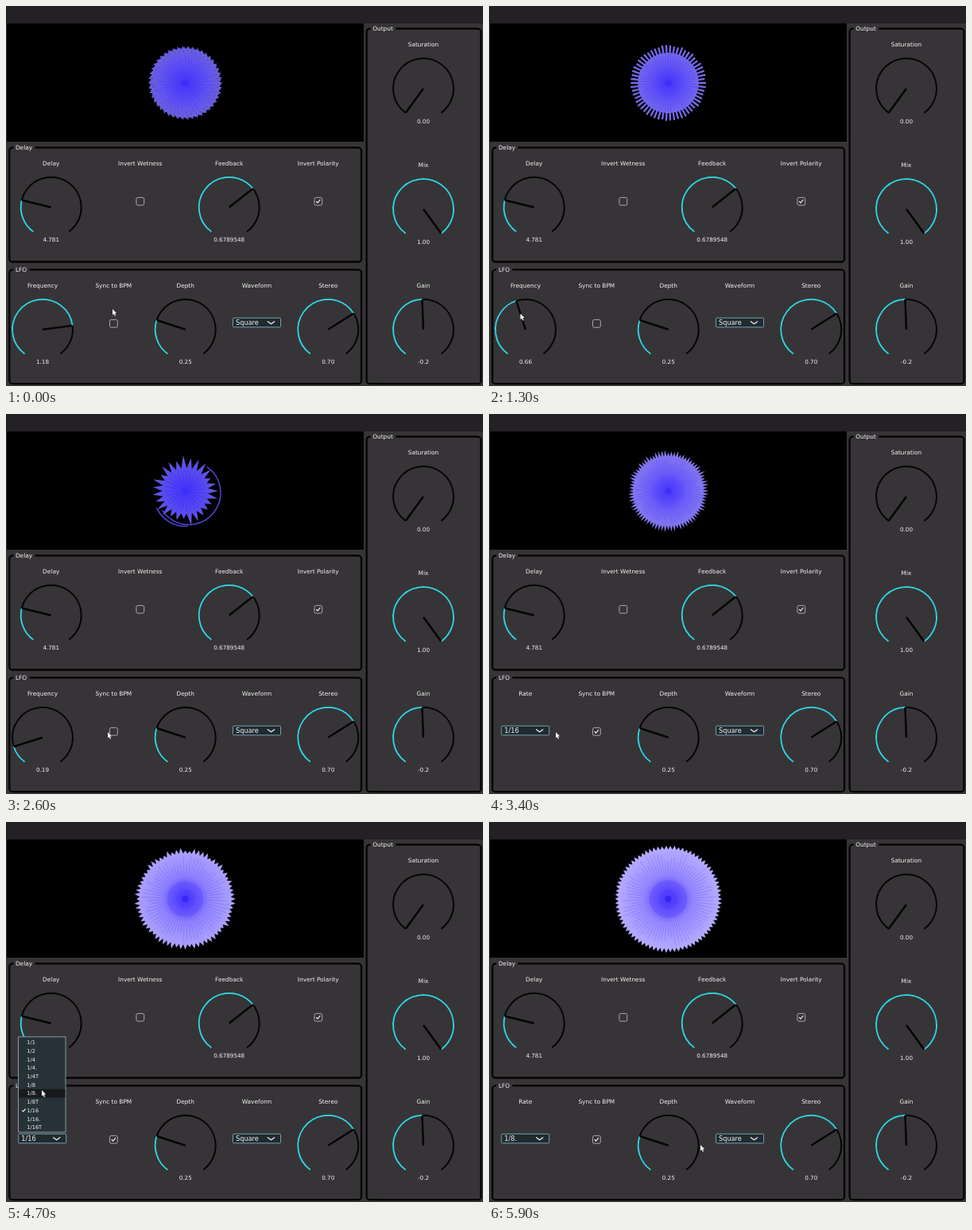
Animation, 600 px wide and 479 px high, one loop 6000 ms. Source, as an HTML page with a canvas:

```html
<!DOCTYPE html>
<html lang="en">
<head>
<meta charset="utf-8">
<title>Delay plugin</title>
<style>
html, body { margin: 0; width: 100%; height: 100%; overflow: hidden; background: #373437; }
canvas { display: block; }
</style>
</head>
<body>
<canvas id="stage" width="600" height="479"></canvas>
<script>
const ctx = document.getElementById('stage').getContext('2d');
const LOOP = 6000, STEP = 100, TAU = Math.PI * 2;
const CYAN = '#35d0df', WHITE = '#f2f2f2', BLACK = '#050505', PANEL = '#373437';
const RATES = ['1/1', '1/2', '1/4', '1/4.', '1/4T', '1/8', '1/8.', '1/8T', '1/16', '1/16.', '1/16T'];

// Each key: time, then the values to interpolate.
const cursorKeys = [
  [0, 134, 382], [500, 70, 402], [800, 59, 390], [1200, 43, 385], [1600, 29, 396],
  [1900, 27, 407], [2100, 28, 411], [2500, 124, 403], [2600, 128, 401], [2800, 134, 399],
  [3000, 133, 399], [3400, 84, 401], [3700, 64, 399], [4000, 63, 398], [4400, 47, 350],
  [4700, 45, 338], [5000, 45, 340], [5500, 200, 395], [5900, 266, 407]
];
const frequencyKeys = [[500, 1.18], [800, 1.02], [1900, 0.22], [2000, 0.19]];
// Radius, tooth depth, raggedness, lightness.
const bloomKeys = [
  [0, 46.5, .22, 0, .08], [800, 50, .2, .09, .35], [1900, 46.5, .22, 0, .08],
  [2600, 45, .36, .22, 0], [3400, 52.5, .17, .08, .4], [4700, 65, .12, .07, .9],
  [5900, 68, .08, .02, 1]
];
const bloomStyles = ['lattice', 'spokes', 'lattice', 'star', 'teeth', 'teeth', 'teeth'];
const bloomCounts = [46, 58, 46, 27, 76, 68, 78];

function track(keys, t) {
  let i = 0;
  while (i < keys.length - 1 && keys[i + 1][0] <= t) i++;
  const a = keys[i], b = keys[Math.min(i + 1, keys.length - 1)];
  const u = b === a ? 0 : Math.max(0, (t - a[0]) / (b[0] - a[0]));
  return a.slice(1).map((v, k) => v + (b[k + 1] - v) * u);
}

function random(i) {
  const x = Math.sin(i * 12.9898 + 4.1) * 43758.5453;
  return x - Math.floor(x);
}

function text(str, x, y, size = 7.4, align = 'center') {
  ctx.font = `${size}px "DejaVu Sans", sans-serif`;
  ctx.textAlign = align;
  ctx.fillStyle = WHITE;
  ctx.fillText(str, x, y + size * .365);
}

function line(points, color, width) {
  ctx.beginPath();
  points.forEach(([x, y]) => ctx.lineTo(x, y));
  ctx.strokeStyle = color;
  ctx.lineWidth = width;
  ctx.stroke();
}

function arc(x, y, r, from, to, color, width) {
  ctx.beginPath();
  ctx.arc(x, y, r, from, to);
  ctx.strokeStyle = color;
  ctx.lineWidth = width;
  ctx.stroke();
}

function box(x, y, w, h, r, stroke, width, fill) {
  ctx.beginPath();
  ctx.roundRect(x, y, w, h, r);
  if (fill) { ctx.fillStyle = fill; ctx.fill(); }
  ctx.strokeStyle = stroke;
  ctx.lineWidth = width;
  ctx.stroke();
}

function group(title, x, y, w, h) {
  box(x, y, w, h, 4, BLACK, 2.3);
  ctx.font = '7.4px "DejaVu Sans", sans-serif';
  ctx.fillStyle = PANEL;
  ctx.fillRect(x + 5, y - 3, ctx.measureText(title).width + 6, 6);
  text(title, x + 7.6, y - .3, 7.4, 'left');
}

function knob(label, x, y, value, shown) {
  const start = .7 * Math.PI, end = 2.3 * Math.PI;
  const angle = start + (end - start) * value;
  const c = Math.cos(angle), s = Math.sin(angle);
  arc(x, y, 38, start, end, BLACK, 2);
  arc(x, y, 38, start, angle, CYAN, 2);
  line([[x, y], [x + 38 * c, y + 38 * s]], BLACK, 2.5);
  text(label, x, y - 55.3);
  text(shown, x, y + 41, 7.2);
}

function tick(x, y, size) {
  line([[x - size, y], [x - size * .3, y + size * .7], [x + size, y - size * .8]], WHITE, 1.2);
}

function checkbox(label, x, y, labelY, checked) {
  text(label, x, labelY);
  box(x - 4.8, y - 4.8, 9.8, 9.8, 2, '#a9a8a9', 1);
  if (checked) tick(x, y, 2.6);
}

function combo(label, x, value) {
  text(label, x, 352.3);
  box(x - 30, 393.2, 60, 11.6, 1, '#6fa0ae', 1, '#212a30');
  text(value, x - 26.5, 399.2, 8.2, 'left');
  line([[x + 13.5, 397.5], [x + 18, 400.8], [x + 22.5, 397.5]], WHITE, 1.3);
}

function menu(hovered) {
  box(15.5, 270.8, 59.5, 120.2, 0, '#8b9aa0', 1, '#263238');
  RATES.forEach((rate, i) => {
    const y = 277.8 + i * 10.7;
    if (i === hovered) {
      ctx.fillStyle = '#171a1c';
      ctx.fillRect(16, y - 5.3, 58.5, 10.7);
    }
    text(rate, 26.3, y, 6.6, 'left');
    if (rate === '1/16') tick(22.4, y, 2.2);
  });
}

function pointer(x, y) {
  const shape = [[0, 0], [0, 7.4], [1.7, 5.9], [2.9, 8.7], [4.1, 8.2], [2.9, 5.4], [5.1, 5.2]];
  ctx.beginPath();
  shape.forEach(([dx, dy]) => ctx.lineTo(x + dx, y + dy));
  ctx.closePath();
  ctx.strokeStyle = '#222';
  ctx.lineWidth = .8;
  ctx.stroke();
  ctx.fillStyle = '#fff';
  ctx.fill();
}

function disc(r, fill) {
  ctx.beginPath();
  ctx.arc(0, 0, r, 0, TAU);
  ctx.fillStyle = fill;
  ctx.fill();
}

const polar = (r, a) => [r * Math.cos(a), r * Math.sin(a)];

function bloom(t) {
  const [R, depth, ragged, light] = track(bloomKeys, t);
  let k = 0;
  bloomKeys.forEach((key, i) => {
    if (Math.abs(key[0] - t) < Math.abs(bloomKeys[k][0] - t)) k = i;
  });
  const style = bloomStyles[k], n = bloomCounts[k], base = R * (1 - depth);
  const tip = i => R * (1 - ragged * random(i));
  const shade = (a, b) => Math.round(a + (b - a) * light);

  const paint = ctx.createRadialGradient(0, 0, 0, 0, 0, R);
  paint.addColorStop(0, '#3d2cfa');
  paint.addColorStop(.45, `rgb(${shade(80, 152)},${shade(66, 138)},${shade(242, 255)})`);
  paint.addColorStop(1, `rgb(${shade(106, 184)},${shade(94, 174)},${shade(224, 255)})`);

  ctx.save();
  ctx.translate(225.5, 97);
  ctx.lineCap = ctx.lineJoin = 'round';

  if (style === 'lattice') {
    disc(base * .97, paint);
    for (let layer = 0; layer < 3; layer++) {
      const rim = [];
      for (let i = 0; i <= n * 2; i++) {
        const r = i % 2 ? base * .96 : R - 1 - layer * 1.2;
        rim.push(polar(r, (i / 2 + layer / 3) / n * TAU));
      }
      line(rim, paint, 1.5);
    }
  } else if (style === 'spokes') {
    disc(base, paint);
    for (let i = 0; i < n; i++) line([[0, 0], polar(tip(i) - 1, i / n * TAU)], paint, 2.3);
  } else {
    ctx.beginPath();
    for (let i = 0; i < n; i++) {
      ctx.lineTo(...polar(tip(i), i / n * TAU));
      ctx.lineTo(...polar(base, (i + .5) / n * TAU));
    }
    ctx.closePath();
    ctx.fillStyle = paint;
    ctx.fill();
    if (style === 'star') {
      arc(4.5, 2.5, 40, -.95, 2.55, '#5145d8', 1.5);
      arc(0, 5, 39.5, 1.5, 2.7, '#5145d8', 1.5);
    }
  }

  // Fine radial texture.
  for (let i = 0; i < n * 2; i++) {
    const a = i / n * Math.PI;
    const tone = i % 2 ? 'rgba(50,34,245,.22)' : 'rgba(175,165,255,.13)';
    line([polar(R * .12, a), polar(base * (.75 + .23 * random(i + 90)), a)], tone, .8);
  }
  disc(R * .35, `rgba(88,68,255,${.4 * light})`);
  disc(R * .18, `rgba(78,58,255,${.4 * light})`);
  disc(R * .06, `rgba(45,28,240,${.7 * light})`);
  ctx.restore();
}

function draw(t) {
  const [frequency] = track(frequencyKeys, t);
  const [x, y] = track(cursorKeys, t);
  const synced = t >= 2900, open = t >= 4000 && t < 5100;

  ctx.fillStyle = PANEL;
  ctx.fillRect(0, 0, 600, 479);
  ctx.fillStyle = '#232123';
  ctx.fillRect(0, 0, 600, 22);
  ctx.fillStyle = '#000';
  ctx.fillRect(1, 22, 449, 149);
  bloom(t);

  group('Delay', 4.3, 178.5, 442.7, 144);
  group('LFO', 4.3, 332.4, 442.7, 143.8);
  group('Output', 453.6, 28.5, 143.8, 447.7);

  knob('Delay', 56.7, 253.8, .235, '4.781');
  checkbox('Invert Wetness', 168.7, 246.2, 198.5, false);
  knob('Feedback', 280.7, 253.8, .679, '0.6789548');
  checkbox('Invert Polarity', 392.7, 246.2, 198.5, true);

  if (synced) combo('Rate', 45.7, t < 5100 ? '1/16' : '1/8.');
  else knob('Frequency', 46, 407.8, frequency / 1.5, frequency.toFixed(2));
  checkbox('Sync to BPM', 135.3, 400.2, 352.3, synced);
  knob('Depth', 225.7, 407.8, .25, '0.25');
  combo('Waveform', 315.5, 'Square');
  knob('Stereo', 405.2, 407.8, .7, '0.70');

  knob('Saturation', 525, 104, 0, '0.00');
  knob('Mix', 525, 256, 1, '1.00');
  knob('Gain', 525, 407.8, .492, '-0.2');

  if (open) menu(y < 391 ? Math.floor((y + 3 - 272.5) / 10.7) : -1);
  pointer(x, y);
}

function frame() {
  const t = performance.now() % LOOP;
  draw(Math.floor(t / STEP) * STEP);
  requestAnimationFrame(frame);
}
frame();
</script>
</body>
</html>
```
